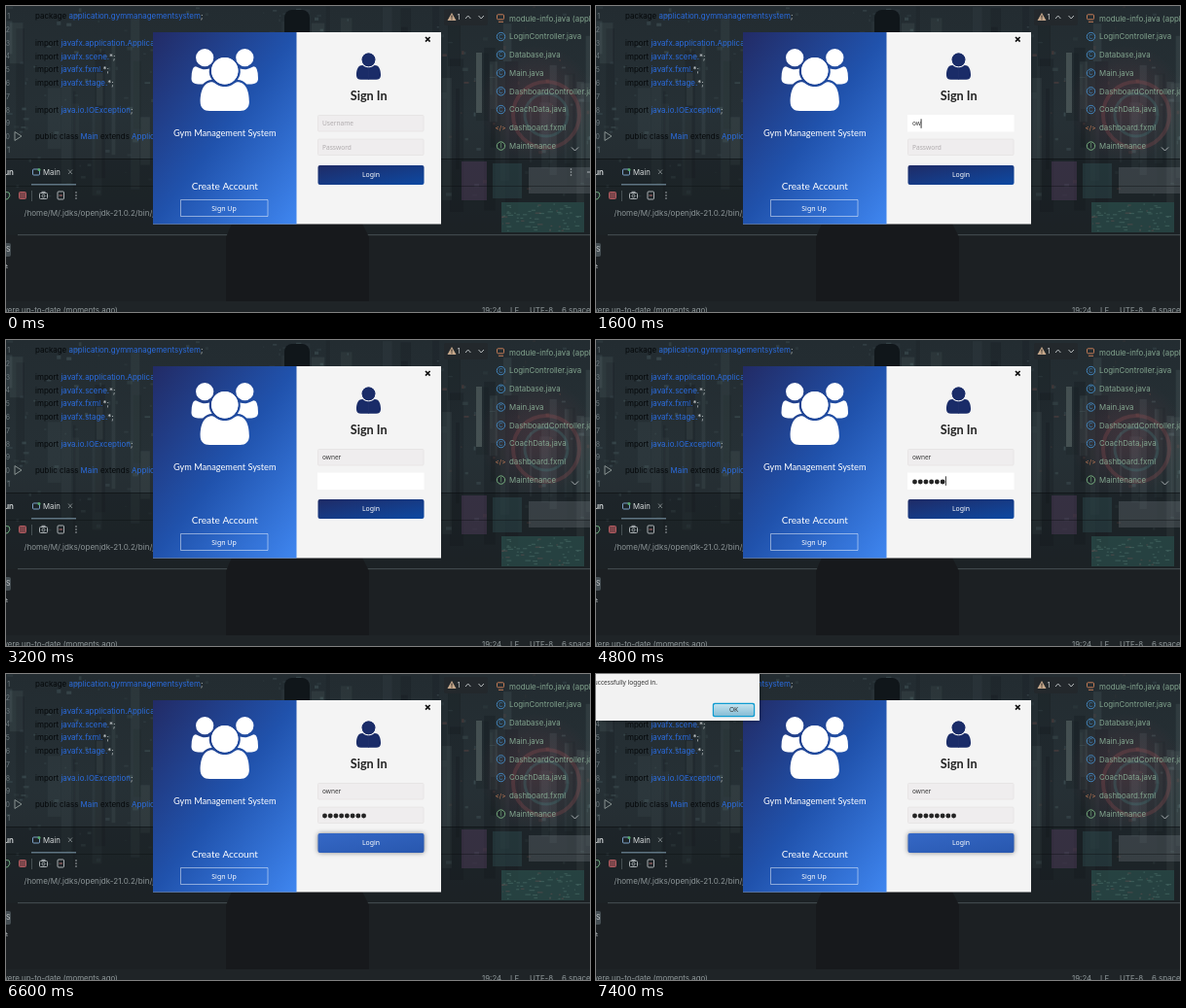
Write an HTML page with a canvas that moves like this. It is 600 px wide and 315 px high and loops after 8 s.

```html
<!DOCTYPE html>
<html lang="en">
<head>
<meta charset="utf-8">
<title>Sign-in screen</title>
<style>
html, body { margin: 0; width: 100%; height: 100%; overflow: hidden; background: #1b2024; }
canvas { display: block; width: 600px; height: 315px; }
</style>
</head>
<body>
<canvas id="stage" width="600" height="315"></canvas>
<script>
const W = 600, H = 315, LOOP = 8000;
const INTER = 'Inter, sans-serif', NOTO = '"Noto Sans", sans-serif', LATO = 'Lato, sans-serif';
const INK = '#05080a', BLUE = '#2a6ce0', PALE = '#cdd2d4', GREY = '#aab0b3', GREEN = '#82a48e';
const USER = 'owner';
const stage = document.getElementById('stage').getContext('2d');
let g = stage;

function rng(seed) {
  return () => (seed = (seed * 16807) % 2147483647) / 2147483647;
}

function box(x, y, w, h, fill) {
  g.fillStyle = fill;
  g.fillRect(x, y, w, h);
}

function round(x, y, w, h, r, fill, stroke, line = 1) {
  g.beginPath();
  g.roundRect(x, y, w, h, r);
  if (fill) { g.fillStyle = fill; g.fill(); }
  if (stroke) { g.strokeStyle = stroke; g.lineWidth = line; g.stroke(); }
}

function trace(points, closed) {
  g.beginPath();
  points.forEach(([x, y]) => g.lineTo(x, y));
  if (closed) g.closePath();
}

function path(points, color, line = 1, closed = false) {
  trace(points, closed);
  g.strokeStyle = color;
  g.lineWidth = line;
  g.stroke();
}

function shape(points, fill) {
  trace(points, true);
  g.fillStyle = fill;
  g.fill();
}

function dot(x, y, r, fill) {
  g.beginPath();
  g.arc(x, y, r, 0, 7);
  g.fillStyle = fill;
  g.fill();
}

function ring(x, y, r, color, line = 1) {
  g.beginPath();
  g.arc(x, y, r, 0, 7);
  g.strokeStyle = color;
  g.lineWidth = line;
  g.stroke();
}

// y is the middle of the line of text
function text(str, x, y, size, family, color, align = 'left', weight = 400) {
  g.font = `${weight} ${size}px ${family}`;
  g.textAlign = align;
  g.fillStyle = color;
  g.fillText(str, x, y + size * 0.35);
  return g.measureText(str).width;
}

function ramp(x0, y0, x1, y1, ...colors) {
  const grad = g.createLinearGradient(x0, y0, x1, y1);
  colors.forEach((c, i) => grad.addColorStop(i / (colors.length - 1), c));
  return grad;
}

// corner to corner, with the other diagonal as the halfway line
function diagonal(x, y, w, h, ...colors) {
  const k = w * h / (w * w + h * h);
  const cx = x + w / 2, cy = y + h / 2;
  return ramp(cx - h * k, cy - w * k, cx + h * k, cy + w * k, ...colors);
}

function glow(x, y, r, rgb, alpha) {
  const grad = g.createRadialGradient(x, y, 0, x, y, r);
  grad.addColorStop(0, `rgba(${rgb},${alpha})`);
  grad.addColorStop(1, `rgba(${rgb},0)`);
  box(x - r, y - r, 2 * r, 2 * r, grad);
}

function wallpaper() {
  const rand = rng(77);
  box(0, 0, W, H, ramp(0, 0, 0, 236, '#232c31', '#263035', '#23292d'));
  for (let i = 0; i < 75; i++) {
    const x = rand() * W, top = rand() * 120;
    const tint = rand() < 0.5 ? '100,120,122' : '8,12,16';
    box(x, top, 2 + rand() * 13, 30 + rand() * (190 - top), `rgba(${tint},${0.06 + rand() * 0.15})`);
  }
  for (let i = 0; i < 220; i++) {
    const x = rand() * W, y = rand() * 195;
    const tint = x > 445 && rand() < 0.4 ? '175,100,85' : '115,145,148';
    box(x, y, 1 + rand() * 5, 1 + rand() * 3, `rgba(${tint},${0.06 + rand() * 0.18})`);
  }
  box(483, 48, 6, 62, 'rgba(150,165,160,.3)');
  glow(545, 100, 60, '130,60,75', 0.28);
  ring(555, 112, 34, 'rgba(165,80,85,.25)', 4);
  ring(555, 112, 22, 'rgba(70,135,135,.25)', 3);

  box(0, 157, W, 79, 'rgba(16,21,25,.35)');
  box(468, 160, 26, 40, 'rgba(120,80,130,.28)');
  box(500, 162, 30, 36, 'rgba(60,110,112,.25)');
  box(537, 166, 63, 27, 'rgba(135,145,150,.25)');
  box(509, 202, 85, 31, 'rgba(55,115,108,.38)');
  for (let i = 0; i < 60; i++) {
    const tint = rand() < 0.3 ? '150,90,90' : '110,150,142';
    box(509 + rand() * 80, 203 + rand() * 28, 1 + rand() * 5, 1.2, `rgba(${tint},.28)`);
  }

  // floor and dark figure
  box(0, 236, W, H - 236, '#1c2023');
  box(12, 235, W - 12, 1.2, 'rgba(115,130,132,.4)');
  shape([[232, 224], [366, 224], [373, 238], [373, 305], [226, 305], [226, 238]], '#17191c');
  round(286, 4, 26, 30, 8, '#10161a');
}

function codeLine(y, keyword, rest, tail = ';') {
  let x = 30;
  x += text(keyword + ' ', x, y, 7.95, INTER, INK);
  x += text(rest, x, y, 7.95, INTER, BLUE);
  text(tail, x, y, 7.95, INTER, PALE);
}

function editor() {
  const row = n => 10.5 + (n - 1) * 13.8;
  codeLine(row(1), 'package', 'application.gymmanagementsystem');
  codeLine(row(3), 'import', 'javafx.application.Application');
  codeLine(row(4), 'import', 'javafx.scene.', '*;');
  codeLine(row(5), 'import', 'javafx.fxml.', '*;');
  codeLine(row(6), 'import', 'javafx.stage.', '*;');
  codeLine(row(8), 'import', 'java.io.IOException');
  let x = 30;
  for (const [word, color] of [['public class ', INK], ['Main', BLUE], [' extends ', INK], ['Application', BLUE]]) {
    x += text(word, x, row(10), 7.95, INTER, color);
  }
  for (let n = 1; n <= 11; n++) text(n % 10, 4, row(n), 7, INTER, '#6c777b', 'right');
  path([[9, 129.5], [16, 134], [9, 138.5]], '#87918f', 1, true);

  round(450, 3, 45, 17, 2, '#23282c');
  shape([[458, 7], [462.5, 15], [453.5, 15]], '#c7a98c');
  box(457.5, 9.5, 1, 3, '#2a2422');
  box(457.5, 13.2, 1, 1, '#2a2422');
  text('1', 463.5, 11.5, 7.5, INTER, '#c9cccd');
  path([[472, 13], [474.7, 10], [477.4, 13]], '#b8bdbf');
  path([[485.5, 10], [488.2, 13], [490.9, 10]], '#b8bdbf');
}

function fileList() {
  const files = ['module-info.java (application)', 'LoginController.java', 'Database.java', 'Main.java',
    'DashboardController.java', 'CoachData.java', 'dashboard.fxml', 'Maintenance'];
  files.forEach((name, i) => {
    const y = 12.8 + i * 18.75;
    text(name, 517, y, 7.9, INTER, GREEN);
    if (i === 0) {
      round(504.5, y - 4, 7, 5, 1, null, '#c27b55');
      path([[506, y + 3.5], [511, y + 3.5]], '#c27b55');
    } else if (i === 6) {
      text('</>', 508, y, 6.5, INTER, '#c27b55', 'center');
    } else {
      const color = i === 7 ? '#76ad7d' : '#4285bd';
      ring(508.5, y, 4.2, color);
      text(i === 7 ? 'I' : 'C', 508.5, y, 6, INTER, color, 'center');
    }
  });
  path([[581, 145.5], [584.5, 149], [588, 145.5]], GREY);
}

function dots(x, y) {
  for (const d of [-3, 0, 3]) dot(x, y + d, 0.8, GREY);
}

function runPanel() {
  box(0, 157, W, 1, 'rgba(10,14,16,.55)');
  text('Run', 8, 171, 8, INTER, '#d3d7d8', 'right', 600);
  round(27.5, 168, 7, 6, 1, null, '#7b9fc4');
  dot(34, 168.5, 1.5, '#55a96b');
  text('Main', 38, 171, 7.8, INTER, '#d3d7d8');
  path([[64, 168.5], [68, 173]], '#8c9496', 0.8);
  path([[68, 168.5], [64, 173]], '#8c9496', 0.8);
  box(26, 183, 46, 1.5, '#5e7482');
  box(0, 185, W, 1, 'rgba(10,14,16,.4)');

  path([[0, 191.5], [3, 192], [4, 195], [2, 198.5], [0, 199]], '#6ca57b');
  round(13.5, 191.5, 7, 7, 1, '#7d464b', '#b15b60');
  box(26, 190, 1, 11, '#465054');
  round(34.5, 192.5, 8, 6, 1, null, GREY);
  ring(38.5, 195.5, 1.5, GREY);
  box(36.5, 190.8, 4, 1, GREY);
  round(53, 191, 6.5, 8, 1, null, GREY);
  path([[54.5, 195], [58, 195]], '#b97272');
  dots(72, 195);

  text('/home/M/.jdks/openjdk-21.0.2/bin/java', 18.5, 213, 8.1, INTER, '#8b9496');
  round(-3, 244, 8, 14, 2, '#454e53');
  text('S', 0, 251, 7, INTER, '#c8cccd');
  text('±', -2, 268, 7, INTER, GREY);

  box(0, 304, W, 11, '#1f2427');
  const status = (s, x, align) => text(s, x, 313, 7.9, INTER, '#8f989a', align);
  status('Files were up-to-date (moments ago)', 115, 'right');
  status('19:24', 489);
  status('LF', 518);
  status('UTF-8', 538);
  status('6 spaces', 571);
}

// draws in units of the icon, both halves from the same outline
function icon(x, y, scale, fill, draw) {
  for (const side of [-1, 1]) {
    g.save();
    g.translate(x, y);
    g.scale(side * scale, scale);
    g.fillStyle = fill;
    g.beginPath();
    draw();
    g.fill();
    g.restore();
  }
}

function person(x, y, scale, fill) {
  icon(x, y, scale, fill, () => {
    g.arc(0, 0, 384, 0, 7);
    g.moveTo(-20, 459);
    g.bezierCurveTo(200, 459, 300, 320, 358, 320);
    g.bezierCurveTo(620, 320, 704, 600, 704, 893);
    g.bezierCurveTo(704, 1060, 600, 1152, 437, 1152);
    g.lineTo(-20, 1152);
  });
}

function companions(x, y, scale, fill) {
  icon(x, y, scale, fill, () => {
    g.arc(576, -384, 256, 0, 7);
    g.moveTo(367, 256);
    g.quadraticCurveTo(529, 261, 632, 384);
    g.lineTo(766, 384);
    g.bezierCurveTo(880, 384, 960, 330, 960, 225);
    g.quadraticCurveTo(960, -128, 836, -128);
    g.bezierCurveTo(800, -128, 700, -43, 576, -43);
    g.quadraticCurveTo(509, -43, 443, -66);
    g.quadraticCurveTo(470, 110, 367, 256);
  });
}

function card() {
  const mid = 224.75;
  box(151, 27, 296, 197.5, '#f4f4f4');
  box(151, 27, 147.5, 197.5, diagonal(151, 27, 147.5, 197.5, '#222b66', '#2052ac', '#3f86f0'));
  companions(mid, 66.8, 0.0357, '#fff');
  person(mid, 66.8, 0.0357, '#fff');
  text('Gym Management System', mid, 130.5, 9.2, LATO, '#fff', 'center');
  text('Create Account', mid, 185, 10, LATO, '#fff', 'center');
  round(179.5, 199.5, 89.5, 17, 0, null, 'rgba(255,255,255,.6)', 0.8);
  text('Sign Up', 224, 208.5, 7, NOTO, '#fff', 'center');

  path([[431, 32], [435.6, 36.6]], '#111', 1.7);
  path([[435.6, 32], [431, 36.6]], '#111', 1.7);
  person(372.5, 55.3, 0.0178, '#1a2c68');
  text('Sign In', 372.7, 93, 12.7, LATO, '#222', 'center', 700);
}

function field(y, focused) {
  if (focused) box(320, y, 109.5, 17.5, '#fff');
  else round(320.5, y + 0.5, 108.5, 16.5, 1, '#efedee', '#e5e2e3', 0.8);
}

const caret = (x, y) => box(x, y, 0.9, 9.5, '#222');

// the value of the last step reached
function at(t, steps) {
  let value = 0;
  for (const [time, v] of steps) if (t >= time) value = v;
  return value;
}

function form(t) {
  const onUser = t >= 600 && t < 3200, onPass = t >= 3200 && t < 6600;
  const typed = USER.slice(0, at(t, [[1200, 1], [1400, 2], [1800, 3], [2200, 5]]));
  const bullets = at(t, [[3800, 1], [4000, 2], [4200, 3], [4600, 4], [4800, 6], [5200, 7], [5400, 8]]);

  field(112, onUser);
  field(136.5, onPass);
  const prompt = (s, y) => text(s, 325, y, 6.6, NOTO, '#b0acae');
  if (t < 600) prompt('Username', 121);
  const width = text(typed, 325, 121, 6.5, NOTO, '#3a3a3a');
  if (t >= 800 && t < 2800) caret(324.7 + width, 116.3);

  if (t < 3200) prompt('Password', 145.5);
  for (let i = 0; i < bullets; i++) dot(327.5 + i * 5.72, 146, 2.45, '#242424');
  const blink = (t >= 3400 && t < 6000) || (t >= 6400 && t < 6600);
  if (blink) caret(324.6 + bullets * 5.72, 140.3);
  loginButton(t >= 6200);
}

function loginButton(hover) {
  const area = [320.5, 164, 109, 20];
  g.save();
  if (hover) {
    g.shadowColor = 'rgba(0,0,0,.45)';
    g.shadowBlur = 5;
  }
  round(...area, 2, hover ? diagonal(...area, '#3568c6', '#2857ae') : diagonal(...area, '#1f2b66', '#0d49a2'));
  g.restore();
  text('Login', 375, 174, 6.9, NOTO, '#fff', 'center');
}

function panelTools() {
  dots(580.5, 171);
  box(597, 170.5, 3, 1, GREY);
}

function alertBox(active) {
  g.save();
  if (active) {
    g.shadowColor = 'rgba(0,0,0,.5)';
    g.shadowBlur = 4;
  }
  box(-4, -4, 172, 52, '#f2f2f2');
  g.restore();
  text('Successfully logged in.', 63, 9, 6.5, NOTO, '#333', 'right');
  if (active) {
    round(119.8, 29.8, 43.4, 14.4, 2, '#0f9bd0');
    round(121, 31, 41, 12, 1.5, ramp(0, 31, 0, 43, '#c3e2ee', '#86bdd5'));
  } else {
    round(120.5, 30.5, 42, 13, 2, ramp(0, 31, 0, 43, '#c9e2ec', '#a3cbdd'), '#8fb4c4', 0.8);
  }
  text('OK', 141.5, 37, 6.6, NOTO, '#333', 'center');
}

const backdrop = document.createElement('canvas');
backdrop.width = W;
backdrop.height = H;
g = backdrop.getContext('2d');
[wallpaper, editor, fileList, runPanel, card].forEach(draw => draw());
g = stage;

const start = performance.now();
function frame() {
  const t = (performance.now() - start) % LOOP;
  g.drawImage(backdrop, 0, 0);
  if (t < 200) panelTools();
  form(t);
  if (t >= 7200) alertBox(t >= 7400);
  requestAnimationFrame(frame);
}
frame();
</script>
</body>
</html>
```
